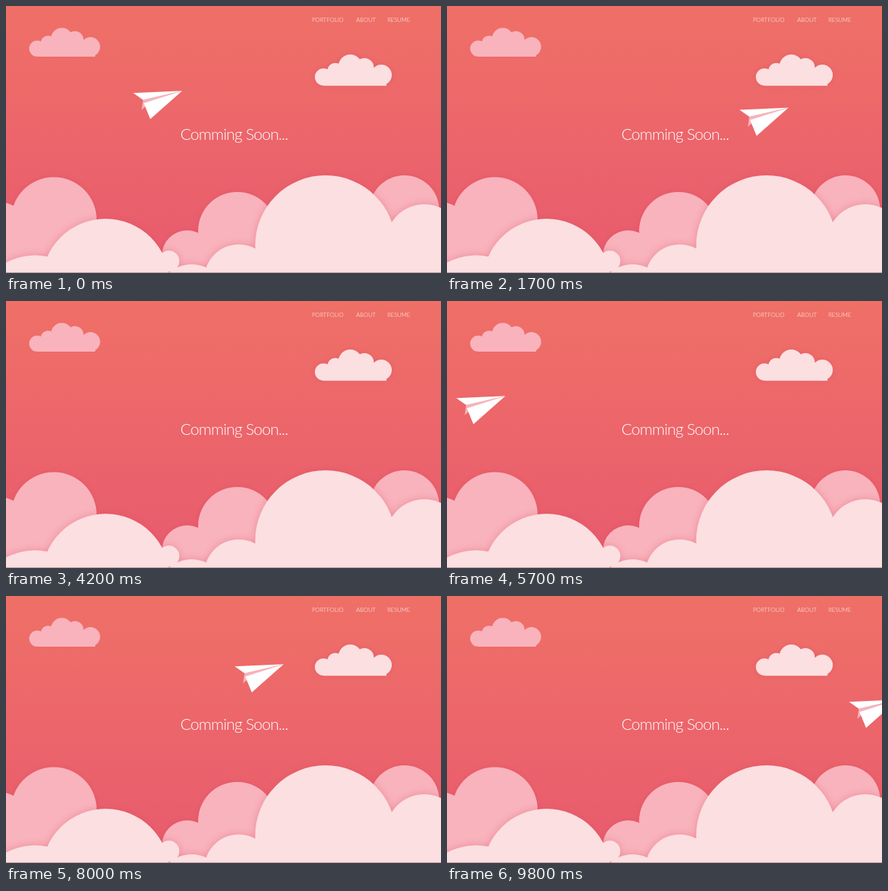
Write an HTML page with a canvas that moves like this. It is 600 px wide and 369 px high and loops after 9900 ms.

```html
<!DOCTYPE html>
<html lang="en">
<head>
<meta charset="utf-8">
<title>Coming soon</title>
<style>
  html, body { margin: 0; width: 100%; height: 100%; overflow: hidden; background: #ec6668; }
  canvas { display: block; width: 600px; height: 369px; }
</style>
</head>
<body>
<canvas id="stage" width="600" height="369"></canvas>
<script>
const ctx = document.getElementById('stage').getContext('2d');
const LOOP = 9900, FLIGHT = 7000, EXIT = 3300, STEP = 100;
const BACK = '#f9b3bd', FRONT = '#fbdfe1', FOLD = '#f7b2bb';
const SHADE = 'rgba(215, 70, 90, 0.38)';

// Turning points of the flight: [ms, x, y] of the nose
const turns = [
  [-1900, 0, 123], [-850, 139, 138], [-300, 209, 105], [300, 275, 131], [1000, 382, 95],
  [1650, 464, 142], [2100, 518, 120], [2800, 621, 144], [EXIT, 678, 148]
];

const mix = (a, b, u) => a + (b - a) * u;
const smooth = u => u * u * (3 - 2 * u);

function disc(x, y, r) {
  ctx.moveTo(x + r, y);
  ctx.arc(x, y, r, 0, Math.PI * 2);
}

function hills(color, ...circles) {
  ctx.beginPath();
  circles.forEach(c => disc(...c));
  ctx.fillStyle = color;
  ctx.fill();
}

function poly(color, ...points) {
  ctx.beginPath();
  points.forEach(([x, y]) => ctx.lineTo(x, y));
  ctx.closePath();
  ctx.fillStyle = color;
  ctx.fill();
}

// Puffs sit on a sine arch above a flat base
function cloud(x, base, scale, color) {
  ctx.save();
  ctx.translate(x, base);
  ctx.scale(scale, scale);
  ctx.beginPath();
  for (const [px, r] of [[11, 11], [26, 10], [45, 15], [63, 12], [84.5, 13.3]]) {
    disc(px, -10 - 15 * Math.sin(Math.PI * (px - 9) / 82), r);
  }
  ctx.rect(11, -16, 80, 16);
  ctx.fillStyle = color;
  ctx.fill();
  ctx.restore();
}

function plane(x, y) {
  const nose = [1, 0];
  ctx.save();
  ctx.translate(x, y - 0.8);
  poly(FOLD, nose, [-53, 12.5], [-55, 26.5], [-48, 20], [-51, 17]);
  poly('#fff', [-66.5, 3], nose, [-53, 12.5]);
  poly('#fff', nose, [-43, 39], [-52, 17]);
  ctx.restore();
}

function text(str, x, y, font, spacing = '0px') {
  ctx.font = font;
  ctx.letterSpacing = spacing;
  ctx.fillStyle = '#fff';
  ctx.fillText(str, x, y);
}

function shadow(color, blur) {
  ctx.shadowColor = color;
  ctx.shadowBlur = blur;
}

function scenery() {
  const sky = ctx.createLinearGradient(0, 0, 0, 320);
  sky.addColorStop(0, '#ef7067');
  sky.addColorStop(1, '#e95d6d');
  ctx.fillStyle = sky;
  ctx.fillRect(0, 0, 600, 369);

  cloud(32, 70, 1, BACK);
  shadow(SHADE, 8);
  cloud(426, 110.2, 1.085, FRONT);
  hills(BACK, [-14, 322, 52], [66, 295.5, 59], [250, 345, 35], [319, 311, 54], [549.5, 282, 48]);
  shadow(SHADE, 12);
  hills(FRONT, [40, 429.5, 85], [137.4, 382, 88], [224.6, 352.5, 14.5], [256, 404, 47],
    [321, 377, 47.5], [440.7, 331, 97], [577, 327, 53]);
  shadow('transparent', 0);
  ctx.fillRect(441, 340, 159, 28);

  ctx.fillStyle = '#bd9ba0';
  ctx.fillRect(0, 368, 600, 1);

  const nav = '300 8px Lato, sans-serif';
  text('PORTFOLIO', 422, 22.4, nav);
  text('ABOUT', 483, 22.4, nav);
  text('RESUME', 526, 22.4, nav);
  text('Comming Soon...', 240.5, 184.5, '300 22px Lato, sans-serif', '-0.8px');
}

function fly(t) {
  const i = turns.findIndex(turn => turn[0] > t);
  if (i < 1) return;
  const [t0, x0, y0] = turns[i - 1], [t1, x1, y1] = turns[i];
  const u = (t - t0) / (t1 - t0);
  plane(mix(x0, x1, u), mix(y0, y1, smooth(u)));
}

function draw(now) {
  const t = Math.floor((now % LOOP) / STEP) * STEP;
  scenery();
  fly(t < EXIT ? t : t - FLIGHT);
}

const start = performance.now();
function tick() {
  draw(performance.now() - start);
  requestAnimationFrame(tick);
}
tick();
</script>
</body>
</html>
```
